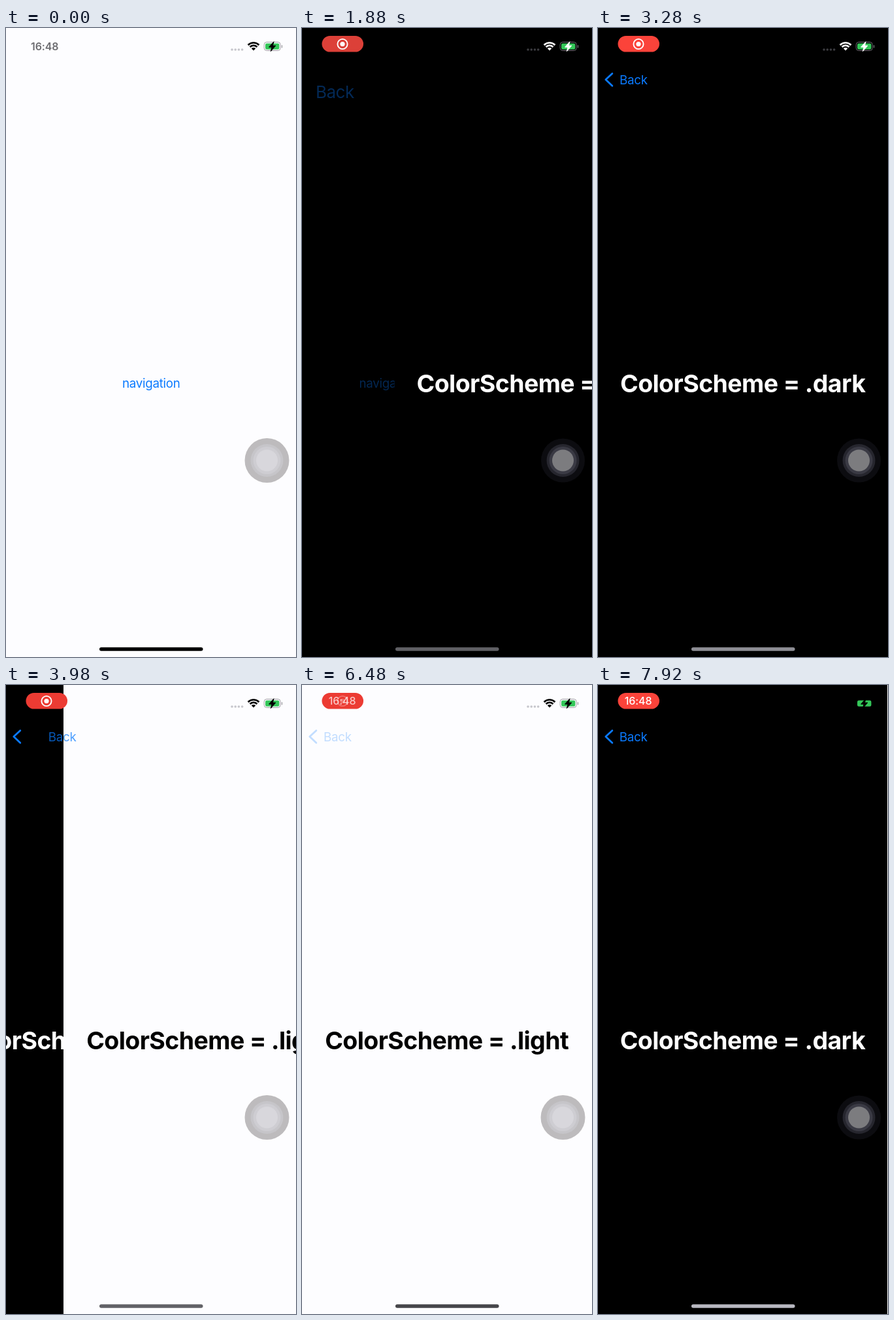
Animation of 444 by 960 pixels, one loop 8000 ms. Source, as an HTML page with a canvas:

```html
<!DOCTYPE html>
<html lang="en">
<head>
<meta charset="utf-8">
<title>Color scheme navigation</title>
<style>
  html, body { margin: 0; width: 100%; height: 100%; overflow: hidden; background: #fdfdff; }
  canvas { display: block; width: 444px; height: 960px; }
</style>
</head>
<body>
<canvas id="stage" width="444" height="960"></canvas>
<script>
const W = 444, H = 960, LOOP = 8000;
const ctx = document.getElementById('stage').getContext('2d');
const FONT = 'Inter, "Open Sans", sans-serif';

const PUSH_DARK = 1489, PUSH_LIGHT = 3480, POP = 6511;
const PARALLAX = 133;
const BLUE = '#0a7aff';

const clamp = v => Math.max(0, Math.min(1, v));
const ramp = (t, a, b) => clamp((t - a) / (b - a));

// Critically damped spring, 0 to 1
function spring(ms) {
  if (ms <= 0) return 0;
  const x = ms * 0.006;
  return 1 - (1 + x) * Math.exp(-x);
}

// Home bar: time and grey level
const homeKeys = [
  [0, 0], [700, 70], [1500, 70], [1880, 96], [3280, 142], [3480, 142],
  [4300, 70], [6520, 70], [6940, 162], [7920, 184]
];

function homeColor(t) {
  let i = 0;
  while (i < homeKeys.length - 2 && t >= homeKeys[i + 1][0]) i++;
  const [t0, a] = homeKeys[i], [t1, b] = homeKeys[i + 1];
  const grey = Math.round(a + (b - a) * ramp(t, t0, t1));
  return `rgb(${grey}, ${grey}, ${Math.round(grey * 1.05)})`;
}

function text(str, x, y, size, weight, color, alpha = 1, spacing = 0, align = 'left') {
  if (alpha <= 0) return;
  ctx.globalAlpha = alpha;
  ctx.font = `${weight} ${size}px ${FONT}`;
  ctx.letterSpacing = spacing + 'px';
  ctx.textAlign = align;
  ctx.fillStyle = color;
  ctx.fillText(str, x, y);
  ctx.globalAlpha = 1;
}

function pillShape(x, y, w, h, r, color) {
  ctx.fillStyle = color;
  ctx.beginPath();
  ctx.roundRect(x, y, w, h, r);
  ctx.fill();
}

function disc(x, y, r, color) {
  ctx.fillStyle = color;
  ctx.beginPath();
  ctx.arc(x, y, r, 0, Math.PI * 2);
  ctx.fill();
}

function touchButton(dark) {
  const rings = dark
    ? [[33.5, '#0c0c10'], [25, '#26262e'], [21, '#3a3a44'], [16.5, '#7c7c7f']]
    : [[34, '#bdbbbd'], [25, '#c6c5c9'], [21, '#cecdd2'], [16.5, '#d8d7dc']];
  for (const [r, color] of rings) disc(399.5, 660, r, color);
}

// Page content moves by shift; the page itself fills from left to the right edge
function page(name, t, left, shift) {
  const dark = name === 'dark' || (name === 'root' && t >= PUSH_DARK);
  ctx.save();
  ctx.beginPath();
  ctx.rect(left, 0, W - left, H);
  ctx.clip();
  ctx.fillStyle = dark ? '#000' : '#fdfdff';
  ctx.fillRect(0, 0, W, H);
  if (name === 'root') {
    const alpha = 1 - 0.68 * ramp(t, 1300, 1480);
    text('navigation', 222.3 + shift, 549, 18.8, 400, BLUE, alpha, -0.3, 'center');
  } else {
    text('ColorScheme = .' + name, 221.6 + shift, 555.8, 37.5, 700,
      dark ? '#fff' : '#000', 1, -0.6, 'center');
  }
  touchButton(dark);
  ctx.restore();
}

function pages(t) {
  let under = 'root', top = 'dark', x = W;
  if (t >= PUSH_LIGHT) {
    under = 'dark';
    top = 'light';
    x = t < POP ? W * (1 - spring(t - PUSH_LIGHT)) : W * spring(t - POP);
  } else if (t >= PUSH_DARK) {
    x = W * (1 - spring(t - PUSH_DARK));
  }
  if (x > 0.3) page(under, t, 0, -PARALLAX * (1 - x / W));
  if (x < W) page(top, t, x, x);
}

function backLabel(x, y, size, alpha) {
  text('Back', x, y, size, 400, BLUE, alpha, -0.016 * size);
}

function chevron(alpha) {
  ctx.globalAlpha = alpha;
  ctx.strokeStyle = BLUE;
  ctx.lineWidth = 2.8;
  ctx.lineCap = ctx.lineJoin = 'round';
  ctx.beginPath();
  ctx.moveTo(21.8, 69.4);
  ctx.lineTo(11.8, 78.8);
  ctx.lineTo(21.8, 88.2);
  ctx.stroke();
  ctx.globalAlpha = 1;
}

function navBar(t) {
  if (t < PUSH_DARK) return;
  const x = 33, y = 85.5, size = 18.8;
  if (t < PUSH_LIGHT) {
    const p = spring(t - PUSH_DARK), q = 1 - p;
    backLabel(x - 38 * q, y + 67 * q, size + 22.4 * q, ramp(p, 0.52, 1));
    chevron(ramp(p, 0.7, 1));
    return;
  }
  const popping = t >= POP;
  const p = spring(t - (popping ? POP : PUSH_LIGHT));
  const press = 1 - 0.76 * ramp(t, 6350, 6470) * (1 - ramp(t, 6540, 6800));
  const s = popping ? p : 1 - p;
  ctx.save();
  ctx.beginPath();
  ctx.rect(13, 50, W, 60);
  ctx.clip();
  backLabel(x - 88 * (1 - s), y, size, ramp(s, 0.35, 0.87));
  backLabel(x + 160 * s, y, size, ramp(1 - s, 0.3, 1) * press);
  ctx.restore();
  chevron(press);
}

function wifi(ink) {
  const cx = 379, cy = 34.5, mid = -Math.PI / 2;
  ctx.strokeStyle = ctx.fillStyle = ink;
  ctx.lineCap = 'butt';
  ctx.lineWidth = 2.7;
  for (const r of [12, 7.8]) {
    ctx.beginPath();
    ctx.arc(cx, cy, r, mid - 0.78, mid + 0.78);
    ctx.stroke();
  }
  ctx.beginPath();
  ctx.moveTo(cx, cy);
  ctx.arc(cx, cy, 4.6, mid - 0.78, mid + 0.78);
  ctx.fill();
}

function battery(light, ink) {
  const shell = light ? '#a4a4a8' : '#6c6c70';
  ctx.strokeStyle = shell;
  ctx.lineWidth = 1;
  ctx.globalCompositeOperation = light ? 'multiply' : 'source-over';
  ctx.beginPath();
  ctx.roundRect(395.2, 21.5, 25, 13, 4);
  ctx.stroke();
  pillShape(421.8, 26, 1.4, 4.5, 0.7, shell);
  ctx.globalCompositeOperation = 'source-over';
  pillShape(397, 23.4, 21.4, 9.4, 2.4, '#34c759');
  ctx.fillStyle = ctx.strokeStyle = ink;
  ctx.lineJoin = 'round';
  ctx.beginPath();
  [[410, 20.8], [402.6, 29.2], [407, 29.2], [405.4, 35.6], [412.8, 27], [408.4, 27]]
    .forEach(([x, y]) => ctx.lineTo(x, y));
  ctx.closePath();
  ctx.fill();
  ctx.stroke();
}

function pillColor(t) {
  if (t >= PUSH_DARK && t < 2400) return '#dc4038';
  const darkUnder = (t >= 2400 && t < 3900) || t > 6700;
  return darkUnder ? '#fb433a' : '#ec3b33';
}

function recordPill(t) {
  const shown = ramp(t, 100, 450);
  text('16:48', 38, 34, 16, 600, '#6c6c70', 1 - shown, -0.1);
  if (!shown) return;
  ctx.globalAlpha = shown;
  pillShape(30.5, 12, 63.5, 24.6, 12.3, pillColor(t));
  const clock = ramp(t, 6280, 6560);
  ctx.globalAlpha = shown * (1 - clock);
  ctx.strokeStyle = '#fff';
  ctx.lineWidth = 1.9;
  ctx.beginPath();
  ctx.arc(62, 24.5, 7.6, 0, Math.PI * 2);
  ctx.stroke();
  disc(62, 24.5, 3.6, '#fff');
  ctx.globalAlpha = 1;
  text('16:48', 40.8, 30.2, 16, 500, '#fff', clock, -0.1);
}

function statusBar(t) {
  const light = t < PUSH_DARK || t >= PUSH_LIGHT;
  const ink = light ? '#000' : '#fff';
  // Dark icons vanish over a dark page
  ctx.globalCompositeOperation = light ? 'multiply' : 'source-over';
  for (let i = 0; i < 4; i++) disc(346 + i * 5.2, 33, 1.8, light ? '#c8c8cc' : '#3c3c40');
  ctx.globalCompositeOperation = 'source-over';
  wifi(ink);
  battery(light, ink);
  recordPill(t);
}

function frame(now) {
  const t = now % LOOP;
  pages(t);
  navBar(t);
  statusBar(t);
  pillShape(143, 945.2, 158.5, 5.6, 2.8, homeColor(t));
}

const start = performance.now();
function tick() {
  frame(performance.now() - start);
  requestAnimationFrame(tick);
}
tick();
</script>
</body>
</html>
```
